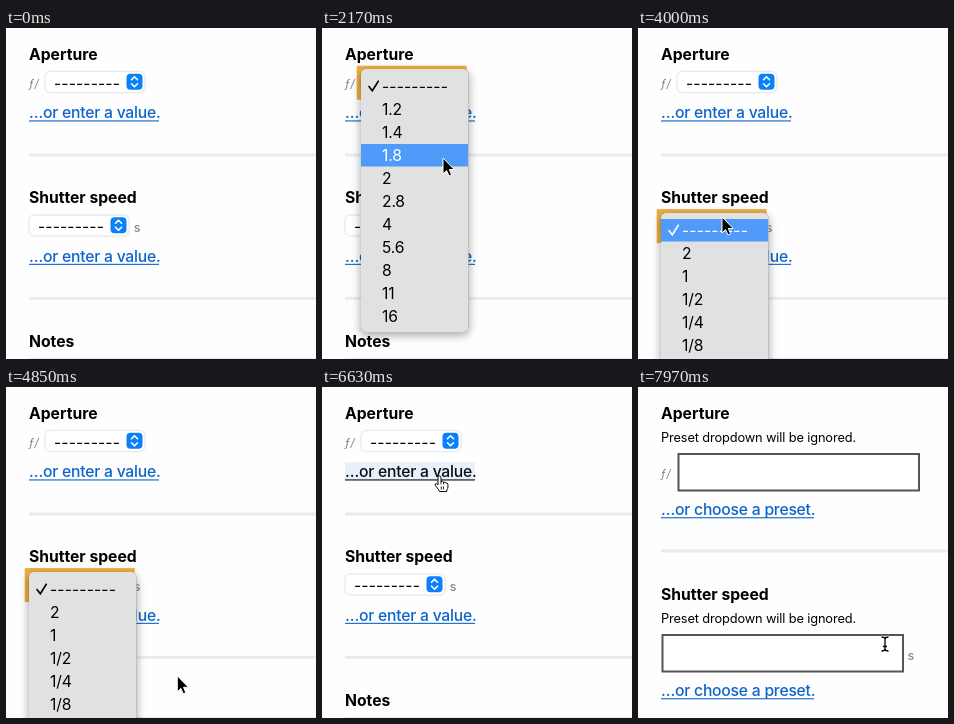
Animation of 310x331 px, one loop 8000 ms. Source, as an HTML page:

```html
<!DOCTYPE html>
<html lang="en">
<head>
<meta charset="utf-8">
<title>Preset dropdowns</title>
<style>
html, body { margin: 0; width: 100%; height: 100%; overflow: hidden; background: #fefefe; }
svg { display: block; width: 100vw; height: 100vh; }
text { font-family: Inter, "Open Sans", sans-serif; font-size: 15.7px; letter-spacing: -.18px; }
.head { font-weight: 650; letter-spacing: 0; }
.link { font-weight: 450; letter-spacing: -.23px; }
.help { font-size: 12.8px; letter-spacing: -.13px; }
.unit { font-size: 12.5px; font-weight: 500; fill: #858585; }
.stop { font-size: 11.5px; font-style: italic; letter-spacing: 1px; fill: #858585; }
.dash { letter-spacing: .12px; }
.box { filter: drop-shadow(0 .6px .9px rgba(0, 0, 0, .25)); }
.menu { filter: drop-shadow(0 3px 5px rgba(0, 0, 0, .26)) drop-shadow(0 0 .6px rgba(0, 0, 0, .5)); }
</style>
</head>
<body>
<svg id="stage" viewBox="0 0 310 331" preserveAspectRatio="none"></svg>
<script>
const LOOP = 8000;
const stage = document.getElementById('stage');
const DASHES = '---------';
const PLAIN = 143.4, CUSTOM = 181; // field heights

// Pointer stops: time, x, y
const stops = [
  [590, 192, 150], [960, 90, 66], [1270, 86, 56], [1840, 86, 56],
  [2170, 121, 130], [2460, 121, 130], [2780, 229, 136], [3050, 229, 136],
  [3830, 84, 189], [4010, 84, 189], [4310, 77, 340], [4400, 77, 340],
  [4490, 77, 327], [4600, 77, 327], [4670, 88, 317], [4850, 171, 289],
  [5200, 226, 208], [5860, 226, 208], [6430, 117.5, 89], [6690, 117.5, 89],
  [6810, 220, 148], [6930, 220, 148], [7760, 122, 264], [7830, 122, 264],
  [7970, 247, 257], [8000, 247, 257]
];

const menus = [
  { x: 39, y: 41, open: 1300, close: 3050, blur: 3920,
    items: [DASHES, '1.2', '1.4', '1.8', '2', '2.8', '4', '5.6', '8', '11', '16'] },
  { x: 23, y: 185, open: 3920, close: 5470, blur: 6450,
    items: [DASHES, '2', '1', '1/2', '1/4', '1/8', '1/15', '1/30'] }
];

const during = (t, a, b) => t >= a && t < b;
const inside = (p, x, y, w, h) => p && p.x >= x && p.x <= x + w && p.y >= y && p.y <= y + h;

function slope(i, k) {
  const a = stops[i - 1], b = stops[i], c = stops[i + 1];
  if (!a || !c) return 0;
  const d1 = b[k] - a[k], d2 = c[k] - b[k];
  return d1 * d2 <= 0 ? 0 : (c[k] - a[k]) / (c[0] - a[0]);
}

function pointer(t) {
  if (t < stops[0][0]) return null;
  let i = 0;
  while (i < stops.length - 2 && t >= stops[i + 1][0]) i++;
  const a = stops[i], b = stops[i + 1], d = b[0] - a[0], u = (t - a[0]) / d;
  const at = k => {
    const s = u * u * (3 - 2 * u);
    return a[k] + (b[k] - a[k]) * s
      + d * u * (1 - u) * ((1 - u) * slope(i, k) - u * slope(i + 1, k));
  };
  return { x: at(1), y: at(2) };
}

const text = (x, y, s, cls = '', fill = '#000') =>
  `<text x="${x}" y="${y}" class="${cls}" fill="${fill}">${s}</text>`;
const rect = (x, y, w, h, fill, more = '') =>
  `<rect x="${x}" y="${y}" width="${w}" height="${h}" fill="${fill}" ${more}/>`;
const group = (x, y, s) => `<g transform="translate(${x} ${y})">${s}</g>`;

function link(y, label, w, hot) {
  const ink = hot ? '#0b0c0c' : '#0c64ca';
  return (hot ? rect(23, y - 15, w, 18, '#e8f1fb') : '')
    + text(23, y, label, 'link', ink)
    + rect(23, y + 2.2, w, 1.1, ink);
}

function select(x, ring) {
  return group(x, 0,
    (ring ? rect(37.2, 40.2, 105, 29, 'none', 'stroke="#ecae42" stroke-width="5"') : '')
    + rect(39.5, 44, 99, 20, '#fff', 'rx="5" class="box"')
    + text(48, 60.5, DASHES, 'dash')
    + rect(120.5, 45.8, 16, 16, '#0a80fb', 'rx="4"')
    + '<path d="M125.5 51.8l3-3 3 3M125.5 55.8l3 3 3-3" fill="none" stroke="#fff" stroke-width="1.6" stroke-linecap="round" stroke-linejoin="round"/>');
}

function field(y, title, x, custom, ring, p) {
  const linkY = custom ? 128 : 90.2, w = custom ? 153 : 130;
  const hot = inside(p, 23, y + linkY - 15, w, 19);
  const unitY = custom ? 91 : 60;
  return group(0, y,
    text(23, 31.7, title, 'head')
    + (x ? text(custom ? 269.5 : 127.7, unitY + .5, 's', 'unit')
         : text(23, unitY, 'ƒ/', 'stop'))
    + (custom
      ? text(23, 55, 'Preset dropdown will be ignored.', 'help')
        + rect(40.5 + x, 67, 240.5, 36.5, '#fff', 'stroke="#555" stroke-width="2"')
      : select(x, ring))
    + link(linkY, custom ? '…or choose a preset.' : '…or enter a value.', w, hot)
    + rect(23, custom ? 162.5 : 125.5, 287, 3, '#ebebeb'));
}

function menu(m, p) {
  const over = p.x >= m.x && p.x <= m.x + 107;
  const row = over ? Math.floor((p.y + 2 - m.y - 6) / 23) : -1;
  const rows = m.items.map((s, i) => {
    const y = 6 + i * 23, ink = i === row ? '#fff' : '#000';
    return (i === row ? rect(0, y, 107, 22.5, '#509bf9') : '')
      + (i ? '' : `<path d="M8 17.5l3.3 4.3 6-9.5" fill="none" stroke="${ink}" stroke-width="1.6" stroke-linecap="round"/>`)
      + text(21, y + 17, s, i ? '' : 'dash', ink);
  });
  return group(m.x, m.y,
    rect(0, 0, 107.5, m.items.length * 23 + 10, '#e1e1e1', 'rx="5" class="menu"') + rows.join(''));
}

const shapes = {
  arrow: '<path d="M0 0V16L3.6 12.6 6 18 8.6 16.9 6.3 11.5H11.2Z" stroke="#fff" stroke-linejoin="round"/>',
  hand: '<g transform="scale(.87)"><path d="M-1.7 10V1.6a1.7 1.7 0 0 1 3.4 0V6.5q2-.9 3 .6 2-.6 2.7.9 2.3-.2 2.3 2v2.5q0 2-1.4 3.6v1.7H0q-.6-1.8-2.6-4L-5 10.5q-.5-1.8 1.3-1.7Z" fill="#fff" stroke="#000" stroke-width="1.1" stroke-linejoin="round"/><path d="M1.7 6.5v3M4.7 7.2v2.5M2 12v3.5M4.5 12v3.5" stroke="#000" fill="none"/></g>',
  beam: ['#fff" stroke-width="3', '#000" stroke-width="1.3'].map(s =>
    `<path d="M-3.5-7Q0-7 0-5 0-7 3.5-7M0-5V5M-3.5 7Q0 7 0 5 0 7 3.5 7M-2 2.5H2" fill="none" stroke="${s}"/>`).join('')
};

function draw(t) {
  const p = pointer(t);
  const first = t >= 6720, second = t >= 7880;
  const y2 = first ? CUSTOM : PLAIN, y3 = y2 + (second ? CUSTOM : PLAIN);
  const open = menus.find(m => during(t, m.open, m.close));
  const ring = menus.map(m => during(t, m.open, m.blur));
  const q = open ? null : p;

  let kind = 'arrow';
  if (inside(q, 23, first ? 113 : 75, first ? 153 : 130, 19)
    || inside(q, 23, y2 + (second ? 113 : 75), second ? 153 : 130, 19)) kind = 'hand';
  else if (first && inside(q, 40, 66, 241, 38)
    || second && inside(q, 23, y2 + 66, 242, 38)) kind = 'beam';

  stage.innerHTML = rect(0, 0, 310, 331, '#fefefe')
    + field(0, 'Aperture', 0, first, ring[0], q)
    + field(y2, 'Shutter speed', -16, second, ring[1], q)
    + text(23, y3 + 32.6, 'Notes', 'head')
    + rect(23, y3 + 43.2, 287, 1, '#e6e6e6')
    + (open ? menu(open, p) : '')
    + (p ? group(p.x, p.y, shapes[kind]) : '');
}

const start = performance.now();
function tick() {
  draw((performance.now() - start) % LOOP);
  requestAnimationFrame(tick);
}
tick();
</script>
</body>
</html>
```
